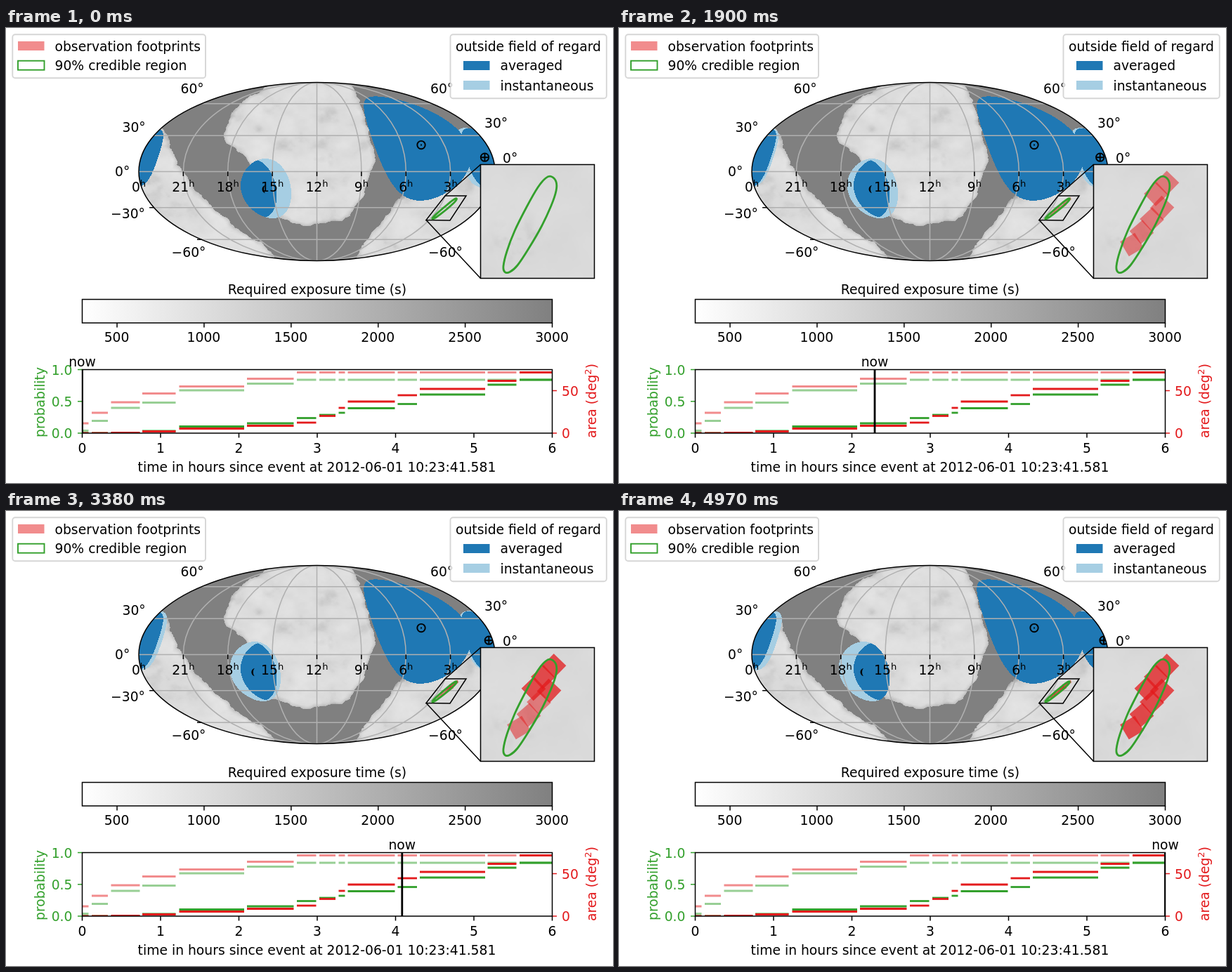
Write an HTML page with a canvas that moves like this. It is 864 px wide and 648 px high and loops after 5 s.

```html
<!DOCTYPE html>
<html lang="en">
<head>
<meta charset="utf-8">
<title>Observation plan</title>
<style>
html, body { margin: 0; width: 864px; height: 648px; overflow: hidden; background: #fff; }
canvas, svg { position: absolute; left: 0; top: 0; }
text { font: 18.75px "DejaVu Sans", sans-serif; white-space: pre; }
</style>
</head>
<body>
<canvas id="sky" width="864" height="648"></canvas>
<svg id="fig" width="864" height="648" viewBox="0 0 864 648"></svg>
<script>
const LOOP = 5000, FRAMES = 145, HOURS = 6;
const GREEN = '#33a02c', RED = '#e31a1c', BLUE = [31, 120, 180], PALE = [166, 206, 227];
const { PI, sin, cos, asin, sqrt, min, max, floor } = Math;
const RAD = PI / 180;
const lerp = (a, b, u) => a + (b - a) * u;
const clamp = (v, a, b) => min(b, max(a, v));

// ---------- Mollweide projection, 12h in the middle ----------
const CX = 442.5, CY = 204.5, RX = 253.5, RY = 127;
function theta(dec) {
  let a = dec * RAD * 0.8;
  for (let i = 0; i < 12; i++)
    a -= (2 * a + sin(2 * a) - PI * sin(dec * RAD)) / (2 + 2 * cos(2 * a));
  return a;
}
function project(ra, dec) {
  const a = theta(dec);
  return [CX + (180 - ra) / 180 * RX * cos(a), CY - RY * sin(a)];
}
const unit = (ra, dec) => [
  cos(dec * RAD) * cos(ra * RAD), cos(dec * RAD) * sin(ra * RAD), sin(dec * RAD)];

// ---------- smooth seeded noise ----------
function rnd(i, j) {
  let h = Math.imul(i, 374761393) + Math.imul(j, 668265263) | 0;
  h = Math.imul(h ^ h >>> 13, 1274126177);
  return ((h ^ h >>> 16) >>> 0) / 2 ** 32;
}
function noise(x, y) {
  const i = floor(x), j = floor(y);
  const s = v => v * v * (3 - 2 * v), u = s(x - i), v = s(y - j);
  return lerp(lerp(rnd(i, j), rnd(i + 1, j), u), lerp(rnd(i, j + 1), rnd(i + 1, j + 1), u), v);
}
function fbm(x, y) {
  let sum = 0, amp = 0.5;
  for (let k = 0; k < 5; k++, amp /= 2, x *= 2, y *= 2) sum += amp * noise(x + 17 * k, y + 31 * k);
  return sum;
}

// ---------- sky background ----------
const W = 510, H = 256, X0 = 188, Y0 = 77;
function makeCanvas(w, h) {
  const c = document.createElement('canvas');
  c.width = w;
  c.height = h;
  return c.getContext('2d', { willReadFrequently: true });
}
const CLEAR_ZONES = [
  [392, 76, 360, 92, 335, 105, 318, 125, 309, 150, 316, 168, 338, 180, 352, 200, 362, 230, 372, 262,
    400, 270, 425, 281, 450, 280, 478, 272, 497, 258, 508, 235, 516, 212, 525, 190, 515, 150, 508, 120,
    500, 95, 486, 76],
  [180, 140, 226, 143, 234, 165, 245, 192, 260, 214, 273, 236, 299, 263, 331, 287, 368, 310, 388, 340, 180, 340],
  [496, 340, 511, 308, 522, 289, 545, 266, 566, 240, 600, 215, 660, 190, 710, 190, 710, 340]
];
function zoneMask() {
  const g = makeCanvas(W, H);
  g.filter = 'blur(6px)';
  g.translate(-X0, -Y0);
  for (const p of CLEAR_ZONES) {
    g.beginPath();
    for (let i = 0; i < p.length; i += 2) g.lineTo(p[i], p[i + 1]);
    g.fill();
  }
  return g.getImageData(0, 0, W, H).data;
}

const SUN = [69.5, 22];
const moonAt = u => [lerp(232.5, 247.75, u * (1.2 - 0.2 * u)), -14.4];
const earthAt = u => [lerp(8.1, 1.9, u), 11.7];
const near = (v, c, r) => v[0] * c[0] + v[1] * c[1] + v[2] * c[2] > r;
const SUN_R = cos(46 * RAD), BODY_R = cos(25 * RAD);

const skyLayer = makeCanvas(W, H), skyImage = skyLayer.createImageData(W, H);
const pixels = [];
(function buildSky() {
  const mask = zoneMask();
  const sun = unit(...SUN);
  const ends = [moonAt, earthAt].map(f => [unit(...f(0)), unit(...f(1))]);
  for (let j = 0; j < H; j++) for (let i = 0; i < W; i++) {
    const x = X0 + i + 0.5, y = Y0 + j + 0.5;
    const X = (x - CX) / RX, Y = (CY - y) / RY;
    if (X * X + Y * Y >= 1) continue;
    const a = asin(Y), sd = (2 * a + sin(2 * a)) / PI, cd = sqrt(1 - sd * sd);
    const ra = PI - PI * X / cos(a), vec = [cd * cos(ra), cd * sin(ra), sd];
    const n = j * W + i;
    const edge = mask[n * 4 + 3] / 255 + (fbm(x / 22, y / 17) - 0.48) * 0.85;
    const cloud = fbm(x / 30 + 50, y / 24 + 9);
    let shade = 128;
    if (edge > 0.46) {
      const rise = clamp((edge - 0.46) * 2.6, 0, 1);
      shade = 180 + 40 * sqrt(rise) + (cloud - 0.48) * 26;
      if (cloud < 0.36) shade -= (0.36 - cloud) * 180 * (1.3 - rise);
    }
    const fixed = near(vec, sun, SUN_R) || ends.some(e => e.every(c => near(vec, c, BODY_R)));
    pixels.push({ at: n * 4, vec, fixed, shade: [shade, shade, shade] });
  }
})();

function paintSky(u) {
  const moon = unit(...moonAt(u)), earth = unit(...earthAt(u)), d = skyImage.data;
  for (const p of pixels) {
    const c = p.fixed ? BLUE
      : near(p.vec, moon, BODY_R) || near(p.vec, earth, BODY_R) ? PALE : p.shade;
    d[p.at] = c[0];
    d[p.at + 1] = c[1];
    d[p.at + 2] = c[2];
    d[p.at + 3] = 255;
  }
  skyLayer.putImageData(skyImage, 0, 0);
}

// ---------- zoomed view ----------
const ZOOM = { x: 675.5, y: 194.5, w: 162, h: 162 };
const zoomLayer = makeCanvas(ZOOM.w, ZOOM.h);
(function buildZoom() {
  const img = zoomLayer.createImageData(ZOOM.w, ZOOM.h);
  for (let j = 0; j < ZOOM.h; j++) for (let i = 0; i < ZOOM.w; i++) {
    const spot = Math.exp(-((i - 50) ** 2 + (j - 105) ** 2) / 700);
    const s = 218 + (fbm(i / 60 + 3, j / 60) - 0.48) * 12 - spot * max(0, fbm(i / 14, j / 14) - 0.45) * 70;
    img.data.set([s, s, s, 255], (j * ZOOM.w + i) * 4);
  }
  zoomLayer.putImageData(img, 0, 0);
})();
// corners of the zoomed patch on the map: TL, TR, BL, BR
const PATCH = [[625, 239], [655, 239], [598, 273.5], [632, 274]];
function toMap([x, y]) {
  const u = (x - ZOOM.x) / ZOOM.w, v = (y - ZOOM.y) / ZOOM.h;
  return [0, 1].map(k => lerp(lerp(PATCH[0][k], PATCH[1][k], u), lerp(PATCH[2][k], PATCH[3][k], u), v));
}

// ---------- map canvas ----------
const ctx = document.getElementById('sky').getContext('2d');
function stroke(color, width, draw) {
  ctx.beginPath();
  draw();
  ctx.strokeStyle = color;
  ctx.lineWidth = width;
  ctx.stroke();
}
const outline = () => ctx.ellipse(CX, CY, RX, RY, 0, 0, 2 * PI);
function segment(x1, y1, x2, y2) {
  ctx.moveTo(x1, y1);
  ctx.lineTo(x2, y2);
}
function grid() {
  for (let k = -3; k <= 3; k++) ctx.ellipse(CX, CY, RX * Math.abs(k) / 4, RY, 0, k < 0 ? PI / 2 : -PI / 2, k < 0 ? 1.5 * PI : PI / 2), ctx.moveTo(CX, CY - RY);
  for (const dec of [-60, -30, 0, 30, 60]) segment(...project(360, dec), ...project(0, dec));
}
function ticks() {
  for (let k = -3; k <= 3; k++) segment(CX + k * RX / 4, CY, CX + k * RX / 4, CY + 6.5);
  for (const dec of [-60, -30]) {
    const [x, y] = project(360, dec);
    segment(x - 6.5, y, x, y);
  }
}
function ring(x, y) {
  stroke('#000', 1.9, () => ctx.arc(x, y, 5.7, 0, 2 * PI));
}
function paintMap(u) {
  paintSky(u);
  ctx.clearRect(0, 0, 864, 648);
  ctx.save();
  ctx.beginPath();
  outline();
  ctx.clip();
  ctx.drawImage(skyLayer.canvas, X0, Y0);
  stroke('#b0b0b0', 1.5, grid);
  ctx.fillStyle = '#000';
  const [sx, sy] = project(...SUN), [ex, ey] = project(...earthAt(u)), [mx, my] = project(...moonAt(u));
  ring(sx, sy);
  ctx.beginPath();
  ctx.arc(sx, sy, 1.1, 0, 2 * PI);
  ctx.fill();
  ring(ex, ey);
  stroke('#000', 1.9, () => {
    segment(ex - 5.7, ey, ex + 5.7, ey);
    segment(ex, ey - 5.7, ex, ey + 5.7);
  });
  ctx.beginPath();
  ctx.moveTo(mx - 0.8, my - 5.8);
  ctx.bezierCurveTo(mx - 7, my - 4, mx - 7, my + 4, mx - 0.8, my + 5.8);
  ctx.bezierCurveTo(mx - 3.6, my + 3, mx - 3.6, my - 3, mx - 0.8, my - 5.8);
  ctx.fill();
  ctx.restore();
  stroke('#000', 1.5, ticks);
  stroke('#000', 1.5, outline);
  ctx.drawImage(zoomLayer.canvas, ZOOM.x, ZOOM.y);
}

// ---------- figure in SVG ----------
const fig = document.getElementById('fig');
function add(tag, attrs, parent = fig) {
  const el = document.createElementNS('http://www.w3.org/2000/svg', tag);
  for (const k in attrs) el.setAttribute(k, attrs[k]);
  return parent.appendChild(el);
}
function label(x, y, str, anchor = 'start', more = {}, sup = '') {
  const el = add('text', { x, y, 'text-anchor': anchor, ...more });
  el.textContent = str;
  if (sup) add('tspan', { dy: -7, style: 'font-size:13.1px' }, el).textContent = sup.trim();
  if (sup.endsWith(' ')) add('tspan', { dy: 7 }, el).textContent = ')';
  return el;
}
const line = (x1, y1, x2, y2, color = '#000', width = 1.5, more = {}) =>
  add('line', { x1, y1, x2, y2, stroke: color, 'stroke-width': width, ...more });
const box = (x, y, width, height, more) => add('rect', { x, y, width, height, fill: 'none', ...more });
const black = { stroke: '#000', 'stroke-width': 1.5 };
const polygon = (pts, more) => add('polygon', { points: pts.map(p => p.join()).join(' '), ...more });

// map labels
['0', '21', '18', '15', '12', '9', '6', '3'].forEach((h, k) =>
  label(CX + (k - 4) * RX / 4, 233, h, 'middle', {}, 'h'));
[[248.5, 93, 60], [165.5, 148, 30], [155, 211, 0], [149, 271, -30], [235.5, 326, -60],
  [604, 93, 60], [681, 142, 30], [707, 192, 0], [601, 326, -60]]
  .forEach(([x, y, d]) => label(x, y, (d < 0 ? '−' : '') + Math.abs(d) + '°'));

// zoomed patch, footprints and credible region
line(...PATCH[0], ZOOM.x, ZOOM.y);
line(...PATCH[2], ZOOM.x, ZOOM.y + ZOOM.h);
polygon([0, 1, 3, 2].map(i => PATCH[i]), { fill: 'none', ...black });

const TILES = [[780, 220.5, 44], [773, 256, 43], [744, 290.5, 49], [730, 308.5, 59],
  [758.5, 272.5, 47], [764.5, 236.5, 47], [751, 253, 46]];
const VISITS = [0, 1, 2, 3, 4, 5, 6, 1, 0, 5, 6, 4, 2, 3];
function tileCorners([x, y, turn]) {
  return [0, 1, 2, 3].map(k => {
    const a = (turn + 45 + 90 * k) * RAD;
    return [x + 17.3 * cos(a), y + 17.3 * sin(a)];
  });
}
const visitShapes = VISITS.map(t => {
  const g = add('g', { fill: RED, 'fill-opacity': 0.5, visibility: 'hidden' });
  const pts = tileCorners(TILES[t]);
  for (const p of [pts, pts.map(toMap)]) polygon(p, {}).remove(), add('polygon', { points: p.join(' ') }, g);
  return g;
});

const REGION = [[776, 211.5], [783, 219], [783, 232], [776, 253], [762, 283], [744, 314], [728, 338],
  [717, 347.5], [710, 347.5], [708, 339], [713, 318], [724, 289], [741, 255], [757, 227], [768, 214]];
function smooth(pts) {
  const n = pts.length, at = i => pts[(i + n) % n];
  let d = 'M' + pts[0];
  for (let i = 0; i < n; i++) {
    const [p, q, r, s] = [-1, 0, 1, 2].map(k => at(i + k));
    d += `C${q.map((v, k) => v + (r[k] - p[k]) / 6)} ${r.map((v, k) => v - (s[k] - q[k]) / 6)} ${r}`;
  }
  return d + 'Z';
}
for (const pts of [REGION, REGION.map(toMap)])
  add('path', { d: smooth(pts), fill: 'none', stroke: GREEN, 'stroke-width': 2.8 });
box(ZOOM.x, ZOOM.y, ZOOM.w, ZOOM.h, black);

// legends
const frame = { fill: '#fff', 'fill-opacity': 0.8, stroke: '#ccc', 'stroke-opacity': 0.8, 'stroke-width': 1.9, rx: 3.75 };
box(9.3, 9.3, 274.7, 62, frame);
box(17, 19, 37.5, 13, { fill: RED, 'fill-opacity': 0.5 });
box(17, 46.7, 37.5, 13, { stroke: GREEN, 'stroke-width': 1.9 });
label(69.5, 32.5, 'observation footprints');
label(69.5, 60, '90% credible region');
box(632.5, 9.3, 222.3, 91, frame);
label(743.5, 32.5, 'outside field of regard', 'middle');
box(651, 47, 37.5, 13, { fill: `rgb(${BLUE})` });
box(651, 75, 37.5, 13, { fill: `rgb(${PALE})` });
label(703.5, 60, 'averaged');
label(703.5, 88.5, 'instantaneous');

// colour bar
const L = 108.5, R = 777.5, HOUR = (R - L) / HOURS;
const ramp = add('linearGradient', { id: 'ramp' }, add('defs', {}));
add('stop', { offset: 0, 'stop-color': '#fff' }, ramp);
add('stop', { offset: 1, 'stop-color': '#808080' }, ramp);
box(L, 386.5, R - L, 33.5, { ...black, fill: 'url(#ramp)' });
label(443, 379, 'Required exposure time (s)', 'middle');
for (let s = 500; s <= 3000; s += 500) {
  const x = L + (s - 300) / 2700 * (R - L);
  line(x, 420, x, 426.5);
  label(x - 0.5, 447, s, 'middle');
}

// timeline
const TOP = 486.5, BOTTOM = 577;
add('rect', { x: L, y: TOP, width: R - L, height: BOTTOM - TOP },
  add('clipPath', { id: 'axes' }));
const inAxes = { 'clip-path': 'url(#axes)' };
const plot = add('g', inAxes);
const STARTS = [108.5, 122, 149.5, 194, 246.5, 343, 414, 446, 473.5, 486.5, 557.5, 589, 685.5, 731];
const ENDS = [117.5, 145, 190.5, 241.5, 339, 409.5, 441.5, 469, 482.5, 553.5, 585, 682, 726.5, 777.5];
const SERIES = [
  [GREEN, 0.5, [573.5, 559.5, 541, 533.5, 516, 506.5, 501]],
  [GREEN, 1, [577, 577, 577, 574, 567.5, 563, 555.5, 551, 548, 541.5, 535.5, 522, 508, 501]],
  [RED, 0.5, [563, 548, 533, 520.5, 510.5, 499.5, 490.5]],
  [RED, 1, [577, 577, 576.5, 574.5, 570.5, 566.5, 562, 552.5, 541, 532, 523, 514, 502.5, 490.5]]
];
for (const [color, opacity, ys] of SERIES)
  STARTS.forEach((x, i) => {
    const y = ys[min(i, ys.length - 1)];
    plot.append(line(x, y, ENDS[i], y, color, 2.8, { 'stroke-opacity': opacity }));
  });
const nowLine = add('line', { y1: TOP, y2: BOTTOM, stroke: '#000', 'stroke-width': 2.8 }, plot);
['0.0', '0.5', '1.0'].forEach((s, i) => {
  const y = lerp(BOTTOM, TOP, i / 2);
  line(L - 6.5, y, L, y, GREEN);
  label(94.5, y + 7, s, 'end', { fill: GREEN });
});
[[0, BOTTOM], [50, 516.5]].forEach(([s, y]) => {
  line(R, y, R + 6.5, y, RED);
  label(791, y + 7, s, 'start', { fill: RED });
});
for (let h = 0; h <= HOURS; h++) {
  line(L + h * HOUR, BOTTOM, L + h * HOUR, BOTTOM + 6.5);
  label(L + h * HOUR, 605, h, 'middle');
}
box(L, TOP, R - L, BOTTOM - TOP, black);
label(442.5, 631.5, 'time in hours since event at 2012-06-01 10:23:41.581', 'middle');
label(0, 0, 'probability', 'middle', { fill: GREEN, transform: 'translate(55 533) rotate(-90)' });
label(0, 0, 'area (deg', 'middle', { fill: RED, transform: 'translate(840 531) rotate(-90)' }, '2 ');
const nowText = label(L, 482, 'now', 'middle');

// ---------- animation ----------
const start = performance.now();
let shown = -1;
function tick() {
  const t = (performance.now() - start) % LOOP;
  const step = min(FRAMES - 1, floor((t + 5) / (LOOP / FRAMES)));
  if (step !== shown) {
    shown = step;
    const u = step / (FRAMES - 1), x = lerp(L, R, u);
    paintMap(u);
    nowLine.setAttribute('x1', x);
    nowLine.setAttribute('x2', x);
    nowText.setAttribute('x', x);
    visitShapes.forEach((g, i) => g.setAttribute('visibility', x > STARTS[i] ? 'visible' : 'hidden'));
  }
  requestAnimationFrame(tick);
}
tick();
</script>
</body>
</html>
```
